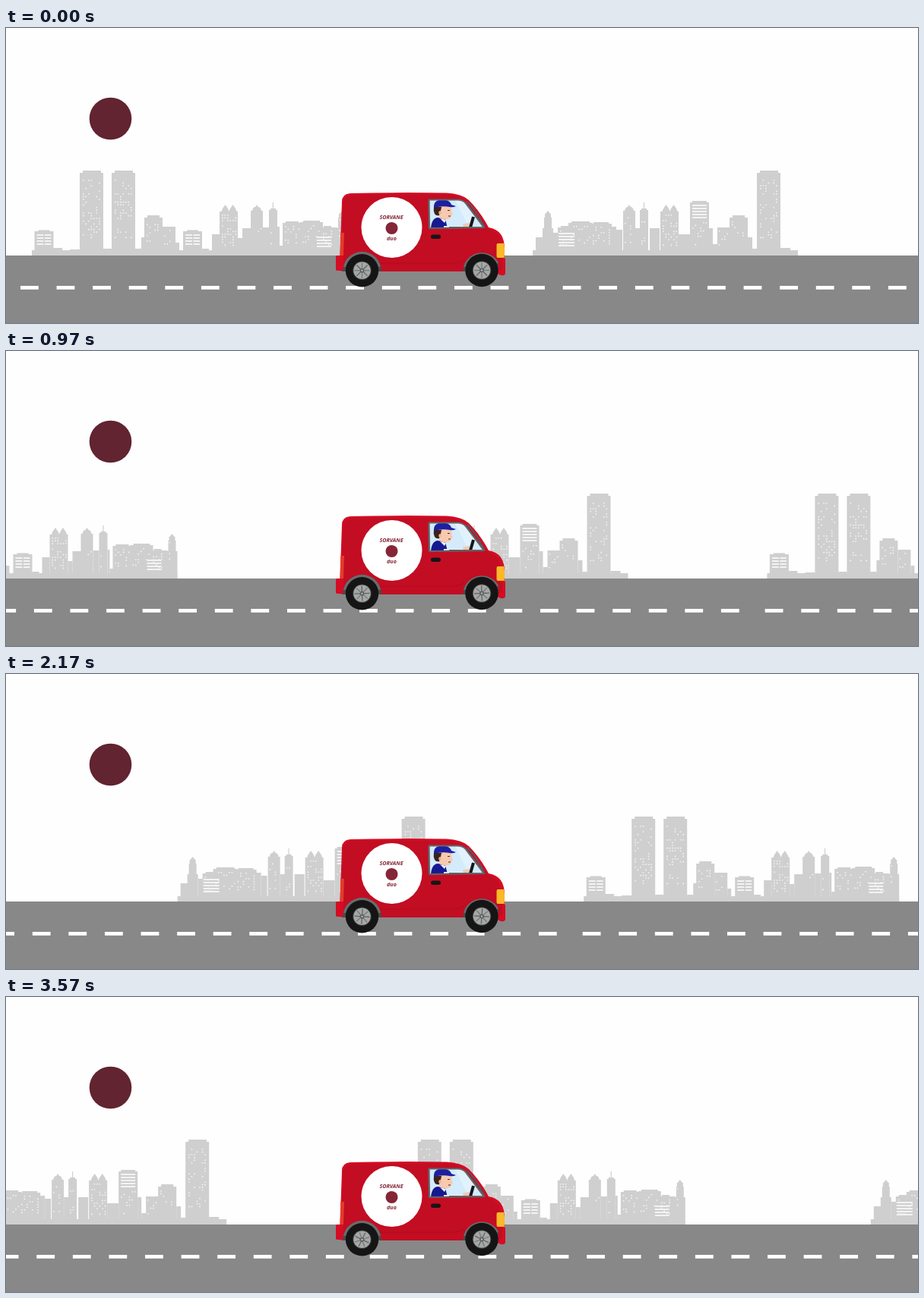
Animation, 1200 px wide and 389 px high, one loop 3670 ms. Source, as an HTML page:

```html
<!DOCTYPE html>
<html lang="en">
<head>
<meta charset="utf-8">
<title>Delivery van</title>
<style>
html, body { margin: 0; width: 100%; height: 100%; overflow: hidden; background: #fefefe; }
svg { display: block; width: 100vw; height: 100vh; }
.label { font: italic 700 7.2px "Open Sans", "Noto Sans", sans-serif; fill: #842636; text-anchor: middle; }
</style>
</head>
<body>
<svg viewBox="0 0 1200 389" preserveAspectRatio="none">
  <defs>
    <g id="city"></g>
    <g id="dashes" fill="#fff"></g>
    <g id="tyre">
      <circle r="21.7" fill="#151515"/>
      <circle r="12.3" fill="#3c3d3d"/>
      <circle r="11.3" fill="#a6a8a8"/>
    </g>
    <clipPath id="pane"><path d="M557 227H594Q601 227 605 232L628 262.500L557 263.500Z"/></clipPath>
  </defs>
  <rect width="1200" height="389" fill="#fefefe"/>
  <circle cx="137.500" cy="119.500" r="27.800" fill="#612430"/>

  <use id="cityA" href="#city"/>
  <use id="cityB" href="#city"/>
  <rect y="300" width="1200" height="89" fill="#888"/>
  <use id="roadA" href="#dashes"/>
  <use id="roadB" href="#dashes"/>

  <g id="van">
    <path fill="#d50c24" d="M442 229Q442 219 453 218Q515 216.500 580 217.500Q600 218.500 609 227Q624 242 635 263Q646 265 651 272Q656 279 656 292V304H657V324Q656 327 651 326L640 321H444L434 319V302Q434 300 437 300H439.500Z"/>
    <path fill="#c30d22" d="M443.500 231Q444 222 454 220.500Q515 219 580 219.500Q597 221 605 228Q621 242 633 264Q645 268 649 276L653 304V318L640 321H447L442 300Z"/>
    <path fill="none" stroke="#ae0c1e" d="M491 310H590Q598 310 603 306"/>
    <path fill="#e63a2a" d="M440.200 270H445L444 300H439.500Z"/>
    <path fill="#d50c24" d="M434 302Q434 300 437 300H444V320H436Q434 320 434 317Z"/>
    <path fill="#fbb929" d="M647 284H655Q657 292 655.500 303H647Q645.500 303 645.500 300V287Q645.500 284 647 284Z"/>

    <path fill="#4a4b4d" d="M443 321A25.500 25.500 0 0 1 494 321Z"/>
    <path fill="#696c6e" d="M444 315A25 25 0 0 1 493 315L490 315A23 23 0 0 0 447 315Z"/>
    <path fill="#4a4b4d" d="M601 321A25.500 25.500 0 0 1 648 311L647 321Z"/>
    <path fill="#696c6e" d="M602 315A25 25 0 0 1 648 309L646 311A23 23 0 0 0 605 315Z"/>

    <path fill="#d3ebfb" d="M557 227H594Q601 227 605 232L628 262.500L557 263.500Z"/>
    <g clip-path="url(#pane)">
      <path fill="#e2f2fc" d="M591 227H602L618 249L607 259Z"/>
      <path fill="#171991" d="M559 264Q560 251 568 250L578 252L581 264Z"/>
      <path fill="#eff3f8" d="M571 251L579 253L577 257ZM576 261H604V264H576Z"/>
      <path fill="#f7c9ae" d="M568 235H586L586.500 243L588 245L586 248Q584 253 578 252.500Q571 252 568 246Z"/>
      <path fill="#3b211b" d="M563 236H573L572 241L570 247Q566 248 564 245Q562 241 563 236Z"/>
      <ellipse cx="571" cy="243.500" rx="1.700" ry="2.500" fill="#eeb297"/>
      <path fill="#1d1fa2" d="M563 237Q562 226.500 574 226.500Q584 226.500 586 233L592 235Q588 237 584 236Q574 234 563 237Z"/>
      <path fill="none" stroke="#4d2922" d="M581 240.500H584M582 248H585"/>
      <path fill="#f4c6ac" d="M601 259L609 257L610 261L602 263Z"/>
      <path fill="none" stroke="#17181b" stroke-width="4" d="M615 249L611 263"/>
      <path fill="none" stroke="#454b51" stroke-width="2" d="M583 263H627"/>
    </g>
    <path fill="none" stroke="#626669" stroke-width="2.200" stroke-linejoin="round" d="M556.500 226.500H594Q601 226.500 605 231L629 263L557 264Z"/>
    <path fill="none" stroke="#565a5e" stroke-width="1.800" d="M607 229Q619 241 630 263"/>
    <rect x="559" y="272.500" width="13" height="5.500" rx="2.700" fill="#171417"/>

    <circle cx="507.500" cy="263" r="40" fill="#fff"/>
    <text class="label" x="507" y="251.500">SORVANE</text>
    <circle cx="507.500" cy="264" r="8" fill="#842636"/>
    <text class="label" x="507.500" y="280">duo</text>

    <g transform="translate(468.500 319.800)"><use href="#tyre"/><g class="spokes"></g></g>
    <g transform="translate(626 319.500)"><use href="#tyre"/><g class="spokes"></g></g>
  </g>
</svg>
<script>
const $ = id => document.getElementById(id);
const GREY = '#cfcfcf', LIT = '#f3f3f3';

let seed = 7;
const rand = () => (seed = (seed * 16807) % 2147483647) / 2147483647;

const box = (x1, x2, y, bottom = 300, fill = GREY) =>
  `<rect x="${x1}" y="${y}" width="${x2 - x1}" height="${bottom - y}" fill="${fill}"/>`;

function dots(x1, x2, y1, y2, chance, size = 1.6) {
  let d = '';
  for (let y = y1; y < y2; y += 3.6)
    for (let x = x1; x < x2 - 1; x += 3.5)
      if (rand() < chance) d += `M${x.toFixed(1)} ${y.toFixed(1)}h${size}v${size}h-${size}z`;
  return `<path d="${d}" fill="${LIT}"/>`;
}

function stripes(x1, x2, y1, y2) {
  let out = '';
  for (let y = y1; y < y2; y += 4) out += box(x1, x2, y, y + 2, LIT);
  return out;
}

const tower = x => box(x, x + 31, 191) + box(x + 4, x + 28, 188) +
  dots(x + 4, x + 28, 200, 278, .3);

const lowHouse = x => box(x, x + 25, 268) + box(x + 5, x + 20, 266.5) +
  stripes(x + 3, x + 12, 272, 288) + stripes(x + 13.5, x + 22, 272, 288);

const block = x => box(x, x + 24, 250) + box(x + 4, x + 20, 247) +
  dots(x + 3, x + 21, 255, 284, .2);

const twinPeaks = x => box(x, x + 24, 242) +
  [4, 14].map(d => `<path d="M${x + d - 2} 243l2-5l3.500-5l3.500 5l2 5z" fill="${GREY}"/>`).join('') +
  dots(x + 3, x + 22, 246, 286, .4);

const spire = x => box(x, x + 16, 241) +
  `<path d="M${x + 2} 241q1-5 4-5l2-3l2 3q3 0 4 5z" fill="${GREY}"/>` +
  dots(x + 2, x + 14, 246, 285, .15);

const mast = x => box(x, x + 11, 240) + box(x + 2, x + 9, 238) +
  box(x + 4.8, x + 6, 230) + dots(x + 2, x + 10, 244, 284, .15);

const beacon = x => box(x, x + 14, 264) + box(x + 2, x + 12, 250) +
  box(x + 3, x + 11, 245) + `<path d="M${x + 3} 246l4-5l4 5z" fill="${GREY}"/>` +
  dots(x + 3, x + 11, 252, 290, .1);

const offices = (x1, x2, y) => box(x1, x2, y) + box(x1 + 4, x2 - 4, y - 2) +
  dots(x1 + 3, x2 - 2, y + 4, 286, .3);

const houses = list => list.map(([a, b, y]) => box(a, b, y)).join('');

$('city').innerHTML =
  // left group
  houses([[34, 449, 293], [62, 74, 290], [84, 97, 292], [128, 139, 291], [170, 178, 291],
    [178, 183, 276], [206, 223, 262], [223, 228, 283], [258, 267, 291], [271, 281, 272],
    [305, 311, 277], [311, 323, 264], [338, 346, 263], [357, 360, 262], [360, 366, 287],
    [428, 436, 263]]) +
  lowHouse(37.5) + tower(97) + tower(139) + block(182) + dots(208, 222, 266, 286, .2) +
  lowHouse(233) + twinPeaks(281) + spire(322) + mast(346) +
  offices(364, 389, 257) + offices(387, 417, 256) + offices(414, 432, 263) +
  stripes(409, 428, 275, 289) + beacon(435) +
  // right group
  houses([[693, 1042, 293], [697, 707, 276], [720, 727, 270], [796, 803, 262], [803, 811, 266],
    [828, 836, 264], [847, 860, 264], [885, 900, 272], [925, 930, 264], [930, 937, 285],
    [936, 953, 263], [976, 982, 276], [982, 988, 291], [1019, 1032, 290]]) +
  beacon(706) + offices(726, 744, 263) + offices(740, 772, 257) + offices(769, 797, 258) +
  stripes(727, 748, 270, 288) + spire(812) + mast(834) + twinPeaks(861) +
  box(900, 925, 230) + box(903, 922, 228) + stripes(903, 922, 233, 252) +
  dots(903, 923, 256, 288, .2) + dots(938, 952, 267, 287, .2) + block(952) + tower(988);

const PITCH = 47.58;
$('dashes').innerHTML = Array.from({ length: 25 }, (_, i) =>
  `<rect x="${19 + i * PITCH}" y="340" width="23.800" height="4.800"/>`).join('');

const spokes = document.querySelectorAll('.spokes');
for (const g of spokes) {
  g.innerHTML = Array.from({ length: 8 }, (_, i) =>
    `<path d="M0 0V-10" transform="rotate(${i * 45})" stroke="${i % 2 ? '#626565' : '#777a7a'}" stroke-width="1.300"/>`
  ).join('') + '<circle r="2.800" fill="#5d6060"/><circle r="1.200" fill="#b8baba"/>';
}

const LOOP = 3670;
const slide = (id, x) => $(id).setAttribute('transform', `translate(${x.toFixed(2)} 0)`);

function draw(ms) {
  const step = Math.floor((ms % LOOP + 30) / 100);
  const n = step ? step + 1 : 0; // the first move is twice as long
  slide('cityA', -20.32 * n);
  slide('cityB', 1188.5 - 20.1 * n);
  slide('roadA', -20 * n);
  slide('roadB', 1199.7 - 20 * n);
  for (const g of spokes) g.setAttribute('transform', `rotate(${n * 53})`);
}

const start = performance.now();
function tick(now) {
  draw(Math.max(0, now - start));
  requestAnimationFrame(tick);
}
draw(0);
requestAnimationFrame(tick);
</script>
</body>
</html>
```
